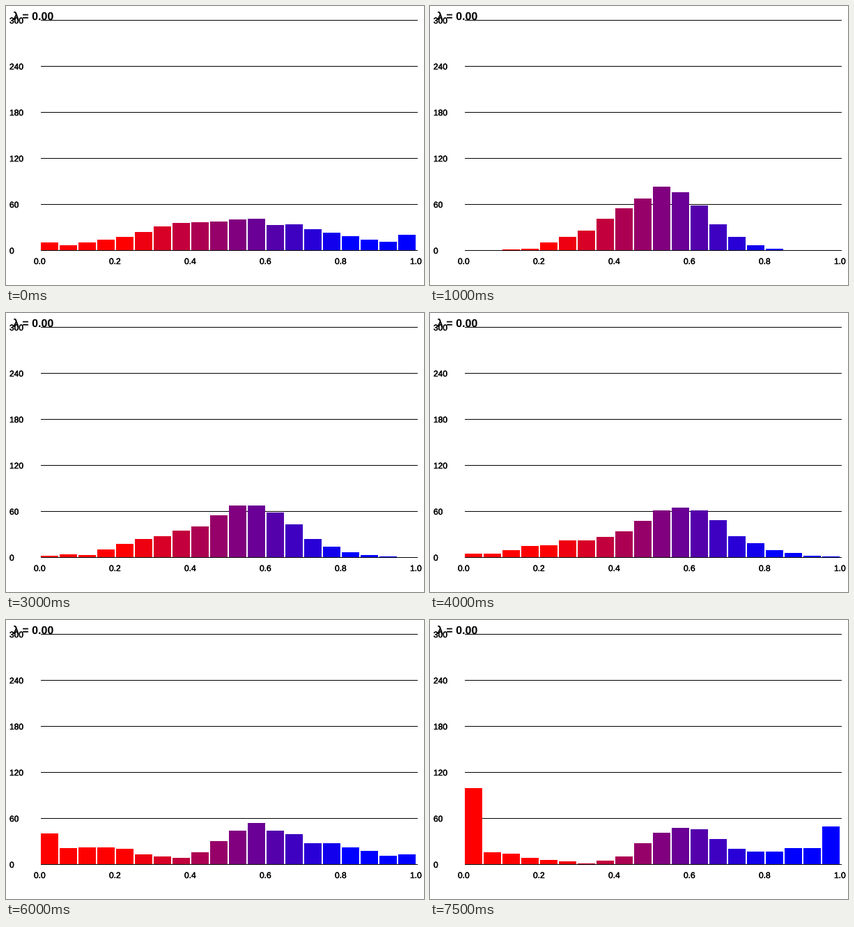
Write a matplotlib script that moves like this. It is 600 by 400 pixels and loops after 8 s.

```python
from math import erf, sqrt

import matplotlib.pyplot as plt
import numpy as np
from matplotlib.animation import FuncAnimation
from matplotlib.patches import Rectangle
from matplotlib.patheffects import withStroke

W, H, DPI = 600, 400, 100
LEFT, BASE, BINS, STEP, BAR_W = 50, 350, 20, 27, 25
FRAME_MS, LOOP_MS = 500, 8000
AREA = 541  # summed bar heights in pixels

plt.rcParams["font.family"] = ["Liberation Sans", "DejaVu Sans"]
plt.rcParams["text.hinting"] = "none"

fig = plt.figure(figsize=(W / DPI, H / DPI), dpi=DPI, facecolor="white")
ax = fig.add_axes([0, 0, 1, 1])
ax.set(xlim=(0, W), ylim=(H, 0))
ax.axis("off")


def box(x, y, w, h, color, z):
    return ax.add_patch(Rectangle((x, y), w, h, fc=color, lw=0, aa=False, zorder=z))


def label(x, y, text, px=12, **kw):
    return ax.text(x, y, text, fontsize=px * 72 / DPI, color="black",
                   va="baseline", zorder=4, **kw)


def bar_color(i):
    red = np.clip(128 - 22 * (i - 10), 0, 255) / 255
    return red, 0, 1 - red


def group(mean, sd):
    """Share of a normal group per bin; whoever passes an end stays in the end bin."""
    edges = np.arange(1, BINS) / BINS
    inner = [0.5 + 0.5 * erf((e - mean) / (sd * sqrt(2))) for e in edges]
    return np.diff([0, *inner, 1])


def heights(n):
    t = n * FRAME_MS / 1000
    drift = t ** 2.2
    low = group(0.40 - 0.005 * drift, min(0.145, 0.09 + 0.012 * t))
    core = group(0.54 + 0.006 * t, 0.09)
    high = group(0.59 + 0.004 * drift, min(0.12, 0.09 + 0.006 * t))
    split = 0.31 * low + 0.45 * core + 0.24 * high
    # The wide opening spread gathers within the first second
    spread = max(0, 1 - t)
    h = AREA * (spread * group(0.53, 0.235) + (1 - spread) * split)
    noise = np.random.default_rng(n).normal(0, 0.4, BINS)
    return np.maximum(0, np.rint(h + noise * np.sqrt(h)))


for k in range(6):
    y = BASE - 66 * k
    box(LEFT, y, 541, 1, "black", 1)
    for text in (label(5, y + 5, str(60 * k)),
                 label(40 + 108 * k, 370, f"{k / 5:.1f}")):
        text.set_path_effects([withStroke(linewidth=0.3, foreground="black")])
label(10, 20, "λ = 0.00", 16, weight="bold")

bars = [box(LEFT + STEP * i, BASE, BAR_W, 0, bar_color(i), 2) for i in range(BINS)]


def update(n):
    for bar, h in zip(bars, heights(n)):
        bar.set_y(BASE - h)
        bar.set_height(h)
    return bars


anim = FuncAnimation(fig, update, frames=LOOP_MS // FRAME_MS,
                     interval=FRAME_MS, repeat=True, repeat_delay=0)
plt.show()
```
